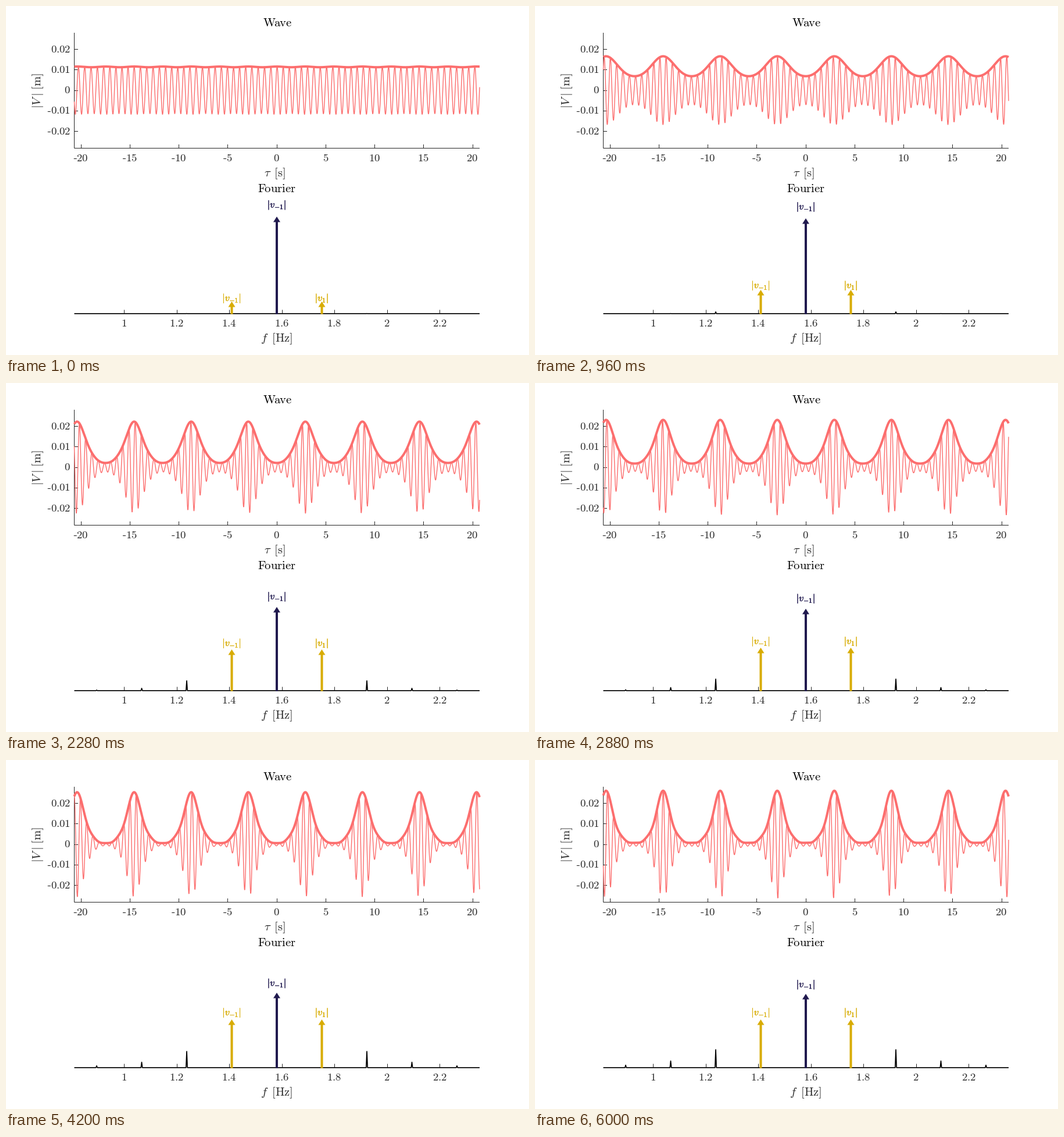
Recreate the animation shown at these times as a matplotlib script. Size 900 by 600 pixels, loop 6.12 s.

```python
import numpy as np
import matplotlib.pyplot as plt
from matplotlib.animation import FuncAnimation
from matplotlib.patches import Polygon
from matplotlib.patheffects import withStroke

plt.rcParams["mathtext.fontset"] = "cm"

FRAMES, INTERVAL = 51, 120
PX = 0.72                       # points per pixel at 100 dpi
INK, CORAL, NAVY, GOLD = "#262626", "#fc6e6e", "#211a4f", "#d8ac00"

LEFT, RIGHT, MID = 117.5, 815, 466
ZERO, FLOOR, BASE = 145.2, 244.5, 528.9
SEC, METRE, HERTZ = 16.85, 3525, 452.4      # pixels per unit
CARRIER = 2 * np.pi * 1.581 / SEC           # radians per pixel
BEAT = 2 * np.pi / 98.2
SIDE = 77.5                                 # sideband spacing
TICK_EM, LABEL_EM, MARK_EM = 18.67, 20.5, 16.4

fig = plt.figure(figsize=(9, 6), dpi=100, facecolor="white")
ax = fig.add_axes([0, 0, 1, 1])
ax.set(xlim=(0, 900), ylim=(600, 0))
ax.axis("off")


def spline(knots, values):
    """Smooth curve through the knots, sampled once per frame."""
    knots, values = np.array(knots, float), np.array(values, float)
    slope = np.gradient(values, knots)
    f = np.arange(FRAMES)
    i = np.clip(np.searchsorted(knots, f, "right") - 1, 0, len(knots) - 2)
    h = knots[i + 1] - knots[i]
    t = (f - knots[i]) / h
    return ((1 + 2 * t) * (1 - t) ** 2 * values[i] + t * (1 - t) ** 2 * h * slope[i]
            + t * t * (3 - 2 * t) * values[i + 1] - t * t * (1 - t) * h * slope[i + 1])


KNOTS = [0, 8, 19, 24, 35, 43, 50]
main = spline(KNOTS, [167, 164, 144, 141, 129, 132, 127])
first = spline(KNOTS, [21, 41, 71, 74, 83, 80, 83])
decay = spline(KNOTS, [0.01, 0.075, 0.24, 0.27, 0.337, 0.35, 0.373])
lag = spline(KNOTS, [1.57, 0.48, 0.1, 0.1, 0.06, 0.1, 0.07])
drift = spline(KNOTS, [0.4, 15.95, 33.75, 41.66, 56.8, 66.4, 74.75])


def line(xs, ys, color=INK, width=1.0, **kw):
    return ax.plot(xs, ys, color=color, lw=width * PX, snap=False,
                   solid_capstyle="butt", **kw)[0]


def crisp(v):
    """Centre of the pixel that holds v."""
    return np.floor(v) + 0.5


def text(x, y, s, em, color=INK, ha="center", **kw):
    return ax.text(x, y, s, fontsize=em * PX, color=color, ha=ha,
                   va="baseline", **kw)


def number(value, x, y, centred=True):
    """Tick label with a short hyphen as its sign."""
    s = f"{abs(value):g}"
    em = TICK_EM
    width = em * (0.5 * len(s.replace(".", "")) + 0.278 * s.count("."))
    if value < 0:
        width += 0.333 * em
    right = x + width / 2 if centred else x
    text(right, y, rf"$\mathrm{{{s}}}$", em, ha="right")
    if value < 0:
        start = right - width
        line([start + 0.01 * em, start + 0.275 * em],
             [crisp(y - 0.215 * em)] * 2, width=1.1)


def draw_axes():
    line([LEFT, LEFT], [46, FLOOR])
    line([LEFT, RIGHT], [FLOOR, FLOOR])
    for v in range(-20, 21, 5):
        x = MID + v * SEC
        line([crisp(x)] * 2, [FLOOR, FLOOR - 6.5])
        number(v, x, 267)
    for v in np.arange(-2, 3) / 100:
        y = ZERO - v * METRE
        line([LEFT, LEFT + 6.5], [crisp(y)] * 2)
        number(v, 111, y + 4.9, centred=False)
    for v in np.arange(5, 12) / 5:
        x = 203.6 + (v - 1) * HERTZ
        line([crisp(x)] * 2, [BASE, BASE - 6.5])
        number(v, x, 551)
    text(MID + 0.5, 35, r"$\mathrm{W\hspace{-0.083}a\hspace{-0.055}v\hspace{-0.028}e}$",
         LABEL_EM, "black")
    text(MID, 320, r"$\mathrm{F\hspace{-0.083}ourier}$", LABEL_EM, "black")
    text(462, 293.5, r"$\tau\ \hspace{0.15}\mathrm{[s]}$", LABEL_EM)
    text(465.5, 577.5, r"$f\ \hspace{0.2}\mathrm{[Hz]}$", LABEL_EM)
    text(60, 145.5, r"$|V\hspace{0.2}|\ \mathrm{[m]}$", LABEL_EM,
         rotation=90, rotation_mode="anchor")


class Arrow:
    def __init__(self, x, name, color):
        self.x = x
        self.shape = Polygon([(x, BASE)] * 3, closed=True, fc=color, ec="none", zorder=4)
        ax.add_patch(self.shape)
        self.label = text(x, BASE, f"$|{name}|$", MARK_EM, color, zorder=5,
                          path_effects=[withStroke(linewidth=0.4 * PX, foreground=color)])

    def set(self, height):
        x, tip, foot = self.x, 529 - height, 529.7
        neck = tip + 9.5
        self.shape.set_xy([(x - 2, foot), (x - 2, neck), (x - 6, neck), (x, tip),
                           (x + 6, neck), (x + 2, neck), (x + 2, foot)])
        self.label.set_y(530 - 1.1 * height)


draw_axes()
xs = np.linspace(LEFT, RIGHT, 2800)
wave = line(xs, 0 * xs, CORAL, 1.4, zorder=3)
envelope = line(xs, 0 * xs, CORAL, 4, zorder=3)
spectrum = line([LEFT, RIGHT], [BASE, BASE], "black", 1.7, zorder=3,
                solid_joinstyle="round")
centre = Arrow(MID, "v_{-1}", NAVY)
lower = Arrow(MID - SIDE, "v_{-1}", GOLD)
upper = Arrow(MID + SIDE, "v_{1}", GOLD)


def update(i):
    harmonics = [first[i] * decay[i] ** (n - 1) for n in range(1, 5)]
    sides = sum(2 * (-1) ** n * a * np.cos(n * BEAT * (xs - MID))
                for n, a in enumerate(harmonics, 1))
    field = 0.239 * (main[i] + np.exp(1j * lag[i]) * sides)
    turn = np.exp(1j * CARRIER * (xs - 812.1 - drift[i]))
    wave.set_ydata(ZERO + (field * turn).real)
    envelope.set_ydata(ZERO - np.abs(field))

    px, py = [LEFT], [BASE]
    for n in (-4, -3, -2, 2, 3, 4):
        x = MID + n * SIDE
        px += [x - 1.2, x, x + 1.2]
        py += [BASE, BASE - harmonics[abs(n) - 1], BASE]
    spectrum.set_data(px + [RIGHT], py + [BASE])

    centre.set(main[i])
    lower.set(first[i])
    upper.set(first[i])
    return wave, envelope, spectrum


anim = FuncAnimation(fig, update, frames=FRAMES, interval=INTERVAL,
                     repeat=True, repeat_delay=0, blit=False)
plt.show()
```
